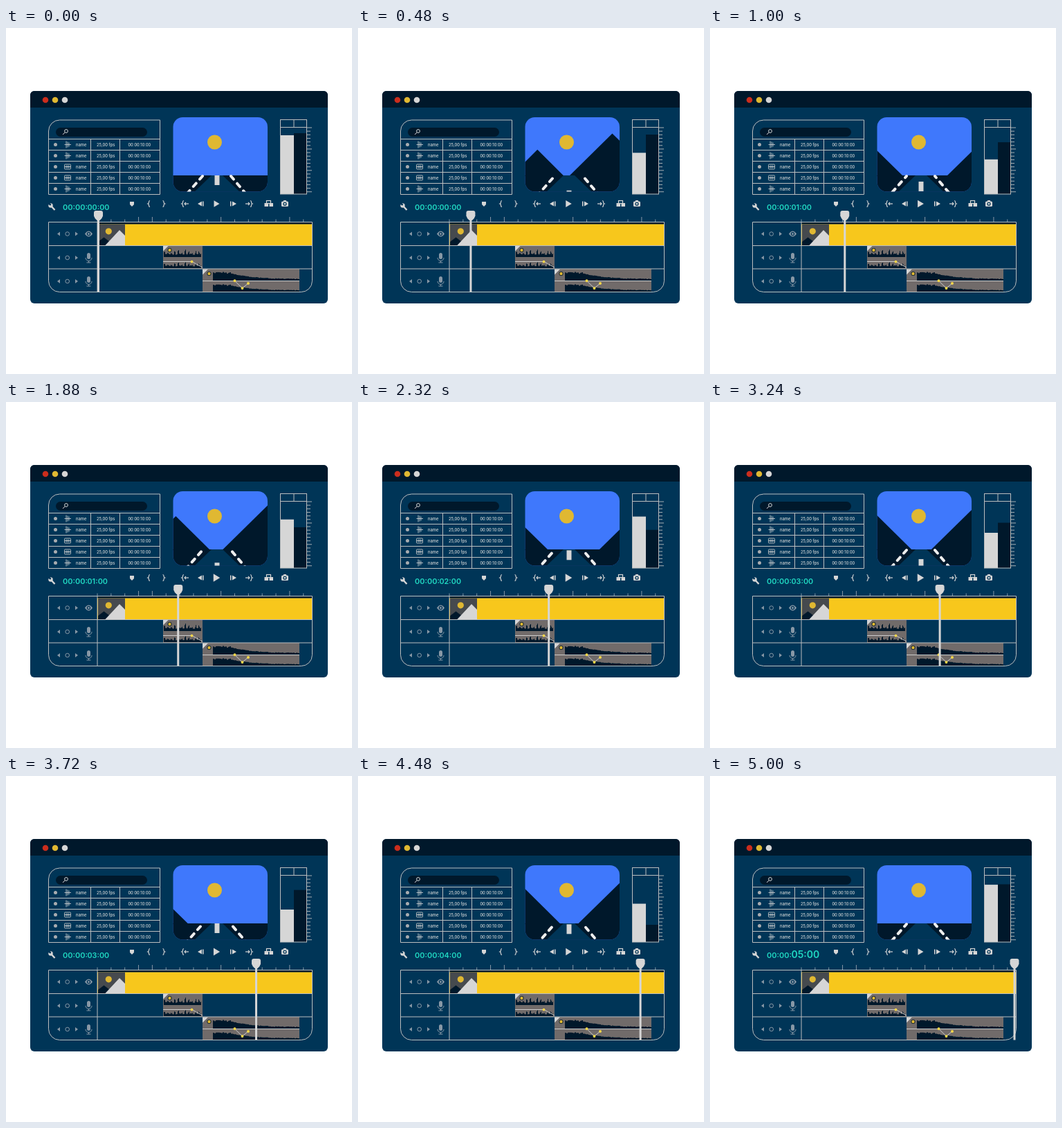
Write an HTML page with a canvas that moves like this. It is 500 px wide and 500 px high and loops after 5.04 s.

```html
<!DOCTYPE html>
<html lang="en">
<head>
<meta charset="utf-8">
<title>Video editor</title>
<style>
html, body { margin: 0; width: 100%; height: 100%; overflow: hidden; background: #fff; }
canvas { display: block; }
</style>
</head>
<body>
<canvas id="stage" width="500" height="500"></canvas>
<script>
const LOOP = 5040, STEP = 40;
const NAVY = '#003557', DARK = '#00182b', LIGHT = '#d6d6d6', FRAME = '#bcbdbe', MUTED = '#8898a6',
  SUN = '#e0b832', YELLOW = '#f7c71c', SKY = '#3f78fc', TEAL = '#20d8c2', CLIP = '#716b6a';
const c = document.getElementById('stage').getContext('2d');

function rect(x, y, w, h, color) {
  c.fillStyle = color;
  c.fillRect(x, y, w, h);
}
function round(x, y, w, h, r) {
  c.beginPath();
  c.roundRect(x, y, w, h, r);
}
function fill(color) { c.fillStyle = color; c.fill(); }
function stroke(color, width = 1) { c.strokeStyle = color; c.lineWidth = width; c.stroke(); }
function path(points) {
  c.beginPath();
  for (let i = 0; i < points.length; i += 2) c.lineTo(points[i], points[i + 1]);
}
function poly(points, color) { path(points); c.closePath(); fill(color); }
function line(points, color = LIGHT, width = 1) { path(points); stroke(color, width); }
function ring(x, y, r) { c.beginPath(); c.arc(x, y, r, 0, 7); }
function disc(x, y, r, color) { ring(x, y, r); fill(color); }
function triangle(x, y, w, h, color) { poly([x, y - h, x + w, y, x, y + h], color); }
function text(s, x, y, size, color, weight = 500) {
  c.font = `${weight} ${size}px Inter, sans-serif`;
  c.fillStyle = color;
  c.fillText(s, x, y);
}

function drawWindow() {
  round(35, 91, 430, 307, 6); fill(NAVY);
  round(35, 91, 430, 24, [6, 6, 0, 0]); fill(DARK);
  ['#cb2d1d', SUN, LIGHT].forEach((color, i) => disc(57 + i * 14, 104, 4.3, color));
}

function drawMediaIcon(y, boxed) {
  if (boxed) {
    round(84.5, y - 3.5, 9, 7, 1); stroke(FRAME, 0.9);
  }
  line([84.5, y, 94, y], LIGHT, 0.8);
  for (let i = 0; i < 3; i++) {
    const h = boxed ? 2 : 5 - i;
    line([87 + i * 2, y - h, 87 + i * 2, y + h], LIGHT, 0.8);
  }
}

function drawBin() {
  round(72, 144, 132, 13, 6.5); fill(DARK);
  ring(87, 149, 2.4); stroke(LIGHT);
  line([85.3, 150.8, 82, 154]);
  round(61.5, 133, 161, 107.5, [16, 0, 0, 0]); stroke(FRAME);
  for (let i = 0; i < 5; i++) {
    const y = 160.5 + i * 16, mid = y + 8;
    line([61, y, 223, y], FRAME);
    disc(71.5, mid, 2.5, '#a9acb0');
    drawMediaIcon(mid, i === 2 || i === 3);
    text('name', 101, mid + 2, 5.8, LIGHT);
    text('25,00 fps', 131, mid + 2, 5.8, LIGHT);
    text('00:00:10:00', 176.5, mid + 2, 5.6, LIGHT);
  }
  for (const x of [122.5, 164.5]) line([x, 160, x, 240], FRAME);
}

// A hill grows steadily while its inner foot accelerates away from the road
function hill(phase, side, start, drift, power, growth) {
  const foot = start + side * drift * phase ** power;
  const half = growth * phase;
  poly([foot, 214, foot + side * half, 213 - half * 0.97, foot + side * half * 2, 214], DARK);
}

function drawMonitor(t) {
  c.save();
  round(241.5, 129, 136.5, 107.5, 14); c.clip();
  rect(241, 129, 138, 108, SKY);
  disc(301.5, 165, 10.5, SUN);
  const phase = t % 1260 / 1000;
  if (phase < 1.21) hill(phase, -1, 300, 21, 3, 80);
  if (phase < 1.15) hill(phase, 1, 294, 48, 2, 130);
  rect(241, 213, 138, 24, DARK);
  poly([297, 213, 313, 213, 338, 237, 272, 237], NAVY);
  c.lineCap = 'round';
  c.setLineDash([6, 8]);
  c.lineDashOffset = -t / 360 * 14;
  line([284, 214, 261, 240], '#eee', 4);
  line([325, 214, 347, 240], '#eee', 4);
  const top = 213 + Math.max(0, t % 720 - 140) * 0.064;
  rect(301.5, top, 7, 14, LIGHT);
  c.restore();
}

// Linear glide through evenly spaced values that wrap around the loop
function glide(values, t) {
  const at = t / LOOP * values.length, i = Math.floor(at);
  const a = values[i], b = values[(i + 1) % values.length];
  return a + (b - a) * (at - i);
}

function drawMeter(t) {
  const left = glide([155, 193, 185, 160, 185, 193, 193], t);
  const right = glide([152, 155, 181, 181, 198, 151, 233], t);
  rect(397, left, 19, 240 - left, LIGHT);
  rect(416, right, 19, 240 - right, DARK);
  c.strokeStyle = FRAME;
  c.lineWidth = 1;
  c.strokeRect(396.5, 132.5, 38, 107.5);
  line([396, 143.5, 435, 143.5], FRAME);
  line([416, 132, 416, 144], FRAME);
  for (let i = 0; i < 19; i++) {
    const y = 144 + i * 5.15;
    line([435, y, i % 6 === 0 ? 442 : 440, y], FRAME, 0.9);
  }
}

function brace(x, side) {
  c.beginPath();
  c.moveTo(x + side * 1.5, 249.5);
  c.quadraticCurveTo(x, 249.5, x, 251.5);
  c.quadraticCurveTo(x, 253.5, x - side * 1.5, 254);
  c.quadraticCurveTo(x, 254.5, x, 256.5);
  c.quadraticCurveTo(x, 258.5, x + side * 1.5, 258.5);
  stroke(LIGHT, 1.2);
}
function arrow(x, dir) {
  line([x - dir * 3, 254, x + dir * 3, 254], LIGHT, 1.2);
  line([x + dir, 252, x + dir * 3, 254, x + dir, 256], LIGHT, 1.2);
}

function drawControls(t) {
  poly([179, 251, 185, 251, 185, 255, 182, 258, 179, 255], LIGHT);
  brace(206.5, 1);
  brace(228, -1);
  brace(255.5, 1); arrow(261, -1);
  triangle(283, 254, -6, 3.5, LIGHT); rect(284, 250.5, 1.5, 7, LIGHT);
  const swell = 1 + 0.2 * Math.sin(Math.PI * t / LOOP);
  triangle(304.5 - 4 * swell, 254, 8 * swell, 4.8 * swell, LIGHT);
  rect(324, 250.5, 1.5, 7, LIGHT); triangle(327, 254, 6, 3.5, LIGHT);
  arrow(349, 1); brace(354.5, -1);
  rect(373.5, 253, 5.5, 5, LIGHT); rect(380.5, 253, 5.5, 5, LIGHT);
  c.strokeRect(376.5, 249.5, 6, 4);
  round(398, 250.5, 10, 7.5, 1.5); fill(LIGHT);
  rect(401, 249, 4, 2, LIGHT);
  ring(403, 254.2, 2); stroke(NAVY, 1.2);
  // Wrench
  line([65, 257, 70.5, 263], LIGHT, 2.4);
  disc(64.5, 256.5, 3.2, LIGHT);
  poly([60, 254, 62, 251.5, 65.5, 255, 64, 256.8], NAVY);
}

function drawTimecode(t) {
  const seconds = Math.floor(t / 1000);
  text('00:00:', 82, 263, 11, TEAL, 600);
  text(`0${seconds}:00`, 117.5, 263, seconds === 5 ? 14 : 10.8, TEAL, 600);
}

function drawHeader(y, video) {
  triangle(78, y, -4, 3, MUTED);
  ring(88.7, y, 2.8); stroke(MUTED);
  triangle(100, y, 4, 3, MUTED);
  if (video) {
    c.beginPath();
    c.moveTo(114, y);
    c.quadraticCurveTo(119.5, y - 8, 125, y);
    c.quadraticCurveTo(119.5, y + 8, 114, y);
    fill(MUTED);
    disc(119.5, y, 2.7, NAVY);
    disc(119.5, y, 1.5, MUTED);
  } else {
    round(117, y - 7, 5, 9, 2.5); fill(MUTED);
    c.beginPath(); c.arc(119.5, y, 4.5, 0, Math.PI); stroke(MUTED);
    line([119.5, y + 4.5, 119.5, y + 7], MUTED);
    line([116.5, y + 7, 122.5, y + 7], MUTED);
  }
}

// Bars standing on a base line; height is a function of distance from the left
function wave(x0, x1, base, height) {
  for (let x = x0; x < x1; x++) {
    const h = height(x - x0);
    rect(x, base - h, 1, h, DARK);
  }
}
const noise = n => Math.abs(Math.sin(n * 12.9898 + 1) * 43758.5453) % 1;
const burst = n => 3 + 2 * noise(n) + (n % 5 < 2 ? 6 * noise(n * 3) : 0);
const decay = n => n < 28 ? 10 + 3 * noise(n >> 1) : 1.5 + 8 * Math.exp((28 - n) / 30) + noise(n >> 1);

function clipBadge(x, y) {
  poly([x, y, x + 8, y, x, y + 8], LIGHT);
  disc(x + 9.5, y + 6.5, 3, DARK);
  disc(x + 9.5, y + 6.5, 2.2, SUN);
}

function drawAudio() {
  rect(227, 315, 57, 33, CLIP);
  wave(228, 282, 331, burst);
  wave(228, 282, 347, n => burst(n) * 0.8);
  clipBadge(227, 314.5);
  line([227, 337.5, 268.5, 337.5, 284, 346], LIGHT, 0.9);
  disc(268.5, 337.7, 1.9, '#f3d64a');

  rect(284, 348, 140, 33, CLIP);
  wave(299, 424, 365, decay);
  wave(299, 424, 381, n => decay(n) * 0.85);
  clipBadge(284, 348.5);
  line([284, 365.5, 424, 365.5], LIGHT, 0.9);
  const keys = [[330.5, 365.3], [341.5, 376], [350, 369]];
  line(keys.flat(), LIGHT, 0.9);
  for (const [x, y] of keys) disc(x, y, 2, '#f3d64a');
}

function drawTracks() {
  for (let i = 0; i < 16; i++) {
    const x = 132 + i * 19.85;
    line([x, i === 3 || i % 5 === 4 ? 273 : 276.5, x, 280], MUTED);
  }
  rect(132, 280, 310, 3.5, DARK);
  rect(132, 283.5, 310, 31, YELLOW);
  rect(133, 283.5, 39, 31, '#464a4e');
  poly([133, 314.5, 133, 309, 141.5, 302.5, 150, 309, 145, 314.5], DARK);
  poly([143, 314.5, 164, 292, 172, 300, 172, 314.5], LIGHT);
  disc(148.3, 293.8, 4.6, SUN);
  drawAudio();
  round(61.5, 280.5, 381, 101, [0, 0, 16, 16]); stroke(FRAME);
  for (const y of [314.5, 348]) line([61, y, 442, y], FRAME);
  line([132, 280, 132, 381], FRAME);
  drawHeader(297.5, true);
  drawHeader(332, false);
  drawHeader(366, false);
}

function drawPlayhead(t) {
  const x = 133.5 + t * 0.0613;
  rect(x - 1.5, 274, 3, 107.5, LIGHT);
  round(x - 6.5, 264, 13, 9.5, 3); fill(LIGHT);
  poly([x - 6.5, 271, x + 6.5, 271, x + 5, 275, x + 2, 278, x - 2, 278, x - 5, 275], LIGHT);
}

function draw() {
  const t = Math.floor(performance.now() % LOOP / STEP) * STEP;
  c.clearRect(0, 0, 500, 500);
  drawWindow();
  drawBin();
  drawMonitor(t);
  drawMeter(t);
  drawControls(t);
  drawTimecode(t);
  drawTracks();
  drawPlayhead(t);
  requestAnimationFrame(draw);
}
draw();
</script>
</body>
</html>
```
